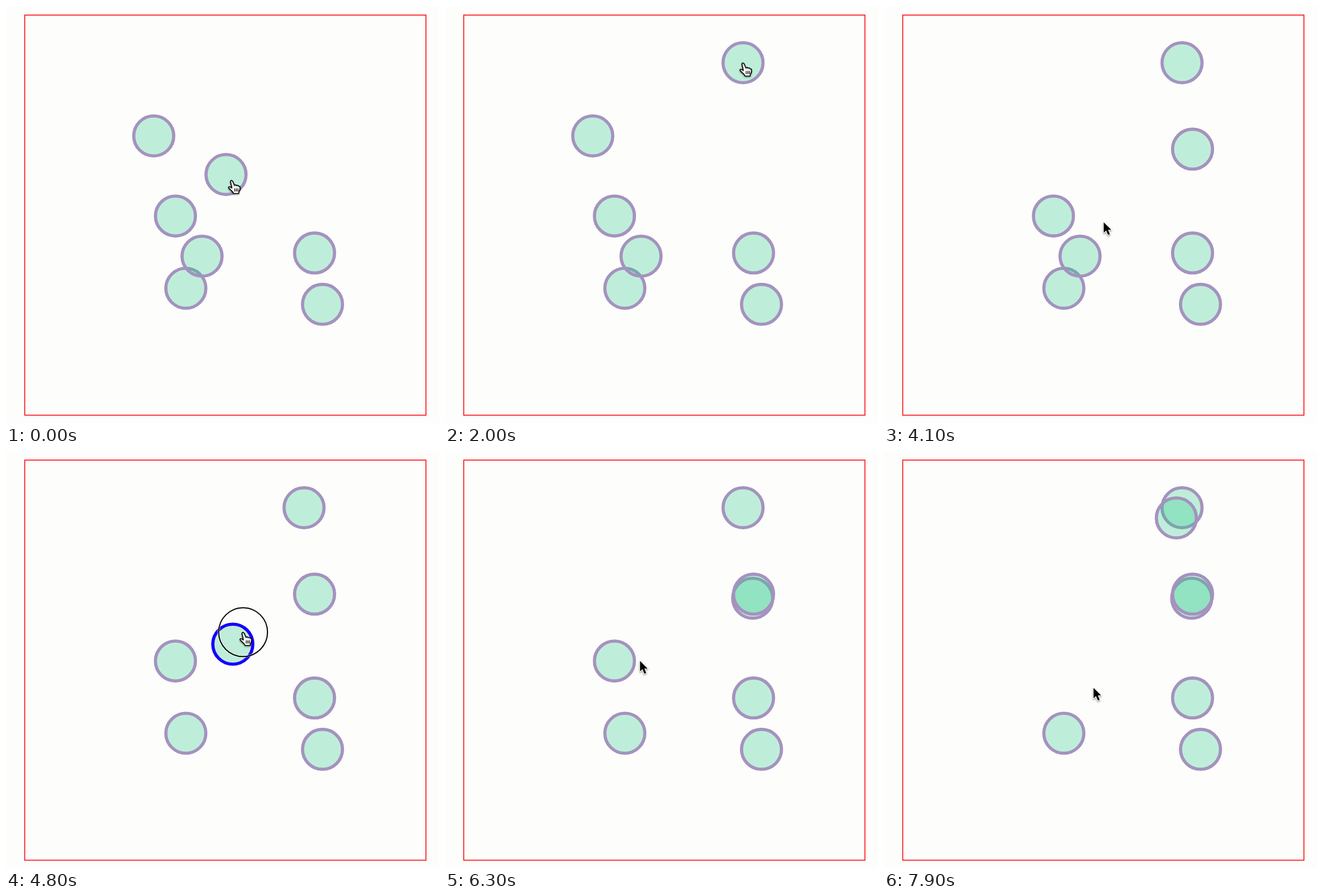
Recreate the animation shown at these times as an HTML page with a canvas. Size 762x735 px, loop 8000 ms.

```html
<!DOCTYPE html>
<html lang="en">
<head>
<meta charset="utf-8">
<title>Dragging circles</title>
<style>
  html, body { margin: 0; width: 100%; height: 100%; overflow: hidden; background: #fdfdfc; }
  canvas { display: block; }
</style>
</head>
<body>
<canvas id="stage" width="762" height="735"></canvas>
<script>
const ctx = document.getElementById('stage').getContext('2d');
const LOOP = 8000, LAG = 75;

// Pointer path: time, x, y
const keys = [
  [0, 397, 307], [900, 397, 307], [1300, 446, 203], [1750, 524.5, 100], [2000, 524.5, 100],
  [2800, 250.7, 231], [3130, 250.7, 231], [3600, 543, 252.3], [3700, 543, 252.3],
  [4100, 387, 381], [4300, 345, 438], [4400, 345, 438], [4800, 417, 319.5],
  [5250, 541.5, 259.5], [5450, 541.5, 259.5], [6300, 343.5, 370], [6430, 300, 369],
  [6520, 300, 369], [7230, 514.5, 118], [7350, 514.5, 118], [7900, 369, 417], [8000, 345, 450]
];

// Back to front; press and release bound the drag
const circles = [
  { x: 543, y: 435.3 },
  { x: 557, y: 525.8 },
  { x: 316.5, y: 497.5 },
  { x: 345, y: 441, press: 4370, release: 5390 },
  { x: 387.2, y: 297, press: 880, release: 1910 },
  { x: 260, y: 229, press: 2980, release: 3680 },
  { x: 298.2, y: 370.2, press: 6490, release: 7320 }
];

const same = (a, b) => a[1] === b[1] && a[2] === b[2];

function tangent(i, axis) {
  const a = keys[i - 1], k = keys[i], b = keys[i + 1];
  if (!a || !b || same(a, k) || same(k, b)) return 0;
  return (b[axis] - a[axis]) / (b[0] - a[0]);
}

function pointerAt(t) {
  let i = 0;
  while (i < keys.length - 2 && keys[i + 1][0] <= t) i++;
  const a = keys[i], b = keys[i + 1], d = b[0] - a[0];
  const u = (t - a[0]) / d, u2 = u * u, u3 = u2 * u;
  const hermite = axis =>
    (2 * u3 - 3 * u2 + 1) * a[axis] + (3 * u2 - 2 * u3) * b[axis] +
    d * ((u3 - 2 * u2 + u) * tangent(i, axis) + (u3 - u2) * tangent(i + 1, axis));
  return { x: hermite(1), y: hermite(2) };
}

function placeAt(c, t) {
  if (!c.press || t < c.press + LAG) return c;
  return pointerAt(Math.min(t, c.release) - LAG);
}

const held = (c, t) => c.press <= t && t < c.release;

function ring(x, y, r, width, color) {
  ctx.beginPath();
  ctx.arc(x, y, r, 0, Math.PI * 2);
  ctx.lineWidth = width;
  ctx.strokeStyle = color;
  ctx.stroke();
}

function drawCircle(p, color) {
  ctx.beginPath();
  ctx.arc(p.x, p.y, 35.2, 0, Math.PI * 2);
  ctx.fillStyle = 'rgba(43, 203, 140, 0.3)';
  ctx.fill();
  ring(p.x, p.y, 35.2, 5.6, color);
}

const hand = new Path2D('M-2 3Q-2 0 0 .5Q2 1 3 4L5 9Q7 7.5 9 9.5Q11 8.5 12.5 10.5' +
  'Q15 10.5 15 13Q15.5 17 13 20L12.5 23.5H3.5Q2 20-1 18Q-5 14.5-5.5 13Q-5 10.5-2 12L.5 13.5Z');
const creases = new Path2D('M5.5 14.5V20M8.3 14.5V20M11 14.5V20');
const arrow = new Path2D('M0 0V18.5L4.3 14.5 7.6 22.3 10.8 20.9 7.6 13.3H13.3Z');

function drawPointer(p, overCircle) {
  ctx.save();
  ctx.translate(p.x, p.y);
  ctx.lineJoin = 'round';
  ctx.shadowColor = 'rgba(0, 0, 0, 0.35)';
  ctx.shadowBlur = 3;
  ctx.shadowOffsetY = 1.5;
  const shape = overCircle ? hand : arrow;
  ctx.fillStyle = '#fff';
  ctx.fill(shape);
  ctx.lineWidth = overCircle ? 1.6 : 2.4;
  ctx.strokeStyle = overCircle ? '#000' : '#fff';
  ctx.stroke(shape);
  ctx.shadowColor = 'transparent';
  if (overCircle) {
    ctx.lineWidth = 1.3;
    ctx.stroke(creases);
  } else {
    ctx.fillStyle = '#000';
    ctx.fill(arrow);
  }
  ctx.restore();
}

function draw(t) {
  ctx.fillStyle = '#fdfdfc';
  ctx.fillRect(0, 0, 762, 735);
  ctx.lineWidth = 1.6;
  ctx.strokeStyle = '#fa0f14';
  ctx.strokeRect(33, 16, 706, 705.3);

  const p = pointerAt(t);
  let over = false, dragging = false;
  for (const c of circles) {
    const at = placeAt(c, t), active = held(c, t);
    drawCircle(at, active ? '#1600fa' : '#a592be');
    dragging = dragging || active;
    over = over || Math.hypot(p.x - at.x, p.y - at.y) < 38;
  }
  if (dragging) {
    ring(p.x, p.y, 43, 4, 'rgba(255, 255, 255, 0.6)');
    ring(p.x, p.y, 43, 2, '#000');
  }
  drawPointer(p, over || dragging);
}

function tick() {
  draw(performance.now() % LOOP);
  requestAnimationFrame(tick);
}
tick();
</script>
</body>
</html>
```
